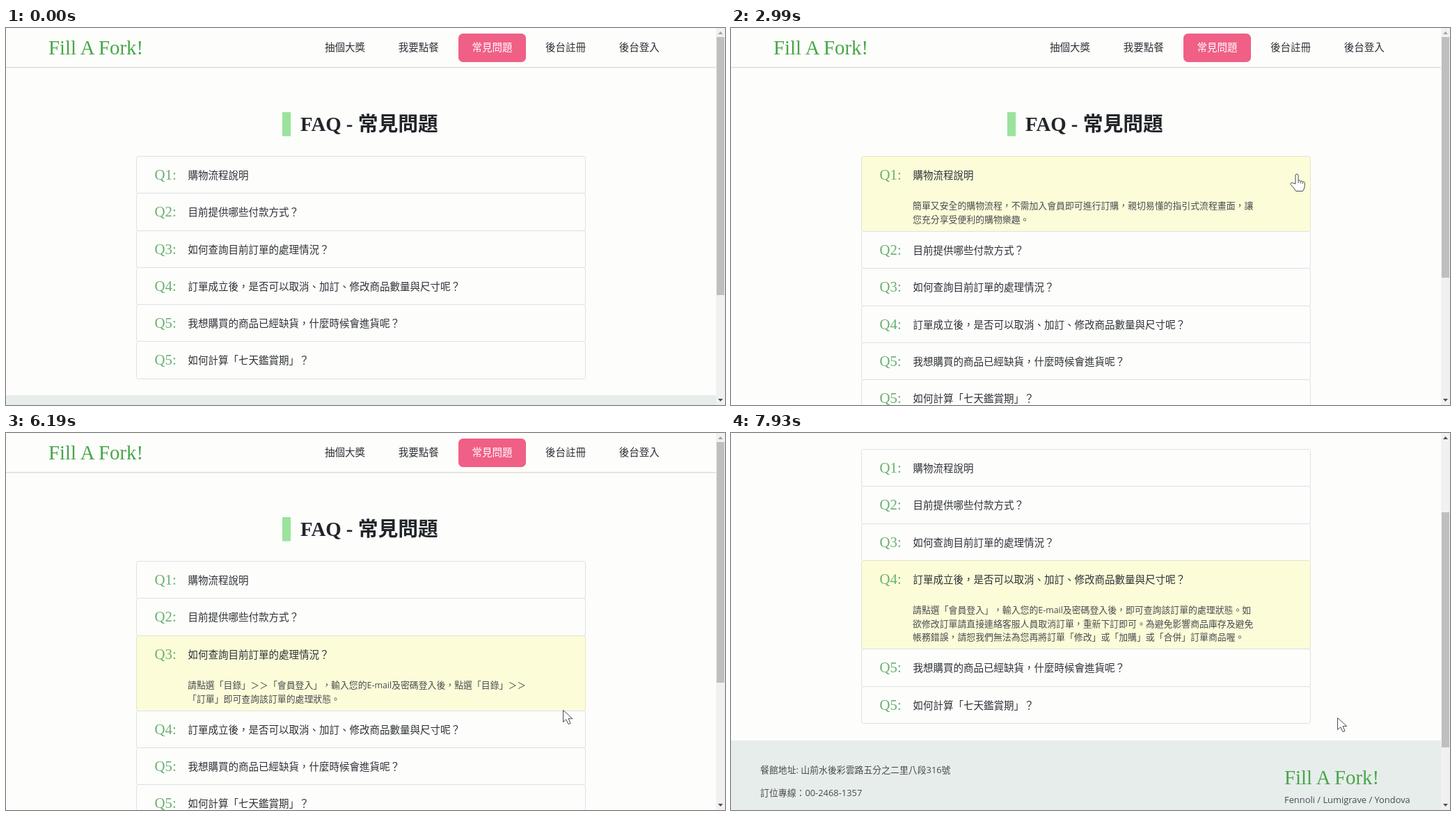
Recreate the animation shown at these times as an HTML page. Size 1033x542 px, loop 8000 ms.

```html
<!DOCTYPE html>
<html lang="zh-Hant">
<head>
<meta charset="utf-8">
<title>FAQ</title>
<style>
  html, body { margin: 0; width: 100%; height: 100%; overflow: hidden; background: #fdfdfb; }
  #stage { display: block; width: 1033px; height: 542px; }
  text {
    font: 14.5px "Open Sans", "Noto Sans CJK TC", "Noto Sans CJK", sans-serif;
    fill: #2c3034; text-spacing-trim: space-all; white-space: pre;
  }
  text.brand { font: 28.8px "Liberation Serif", serif; fill: #47a649; }
  text.title { font: bold 28.8px "Liberation Serif", "Noto Sans CJK TC", "Noto Sans CJK", serif; fill: #212529; }
  text.label { font: 20.8px "Liberation Serif", serif; fill: #69b070; }
  text.small { font-size: 12.88px; fill: #484b4e; }
  text.on { fill: #fff; }
  .latin { font-size: 12.4px; }
  .box { stroke: #dfe0e6; stroke-width: 1; }
  .cursor path { fill: #fff; stroke: #4a4a54; stroke-width: 1; stroke-linejoin: round; }
</style>
</head>
<body>
<svg id="stage" viewBox="0 0 1033 542">
  <g id="page">
    <rect y="56" width="1020" height="1" fill="#dcddd3"/>
    <rect y="57" width="1020" height="1" fill="#f0f0ea"/>
    <rect x="650" y="8" width="97" height="41" rx="6.5" fill="#f05f86"/>
    <rect x="397" y="121" width="12" height="34.5" fill="#9ae39d"/>
  </g>
  <g id="bar">
    <rect x="1020" width="13" height="542" fill="#f1f1f1"/>
    <rect id="thumb" x="1021" width="11" fill="#bfbfbf"/>
    <path id="up" d="M1023 9L1026.5 5L1030 9Z"/>
    <path d="M1023 533L1026.5 537L1030 533Z" fill="#505050"/>
  </g>
  <g id="arrow" class="cursor">
    <path d="M.5 .5V17.5L4.7 13.8L8 20.6L11 19.3L8 12.7H13.8Z"/>
  </g>
  <g id="hand" class="cursor">
    <path d="M-2 14V2a2 2 0 0 1 4 0V9.5a2 2 0 0 1 3.2 .8a2 2 0 0 1 3 1a1.8 1.8 0 0 1 3 1.6V17Q11 21 8.5 24.5H-1.5Q-4 20 -8.3 15.8A1.9 1.9 0 0 1 -5.5 13Z"/>
    <path d="M2 9.5V13M5.2 10.5V13.5M8.2 11.5V14"/>
  </g>
</svg>
<script>
const LOOP = 8000, VIEW = 542, TOP = 184.5, ROW = 53.25, LINE = 19.44, SLIDE = 400;
const BRAND = 'Fill A Fork!';
const $ = id => document.getElementById(id);

function add(parent, tag, attrs, text) {
  const el = document.createElementNS('http://www.w3.org/2000/svg', tag);
  set(el, attrs);
  if (text) el.innerHTML = text;
  return parent.appendChild(el);
}
function set(el, attrs) {
  for (const k in attrs) el.setAttribute(k, attrs[k]);
}
const write = (parent, x, y, text, cls = '') => add(parent, 'text', { x, y, class: cls }, text);
const latin = s => s.replace(/[A-Za-z-]{2,}/g, '<tspan class="latin">$&</tspan>');

// start and end are the moments an answer begins to open and to close
const faq = [
  { label: 'Q1:', ask: '購物流程說明', start: 2600, end: 3780, answer: [
    '簡單又安全的購物流程，不需加入會員即可進行訂購，親切易懂的指引式流程畫面，讓',
    '您充分享受便利的購物樂趣。'] },
  { label: 'Q2:', ask: '目前提供哪些付款方式？', start: 3780, end: 4660, answer: [
    '目前提供付款方式有四種：『超商取貨』付款、『信用卡』付款、『ATM』付款、『超',
    '商代碼』付款。'] },
  { label: 'Q3:', ask: '如何查詢目前訂單的處理情況？', start: 4660, end: 6580, answer: [
    '請點選「目錄」＞＞「會員登入」，輸入您的E-mail及密碼登入後，點選「目錄」＞＞',
    '「訂單」即可查詢該訂單的處理狀態。'] },
  { label: 'Q4:', ask: '訂單成立後，是否可以取消、加訂、修改商品數量與尺寸呢？', start: 6580, end: 9000, answer: [
    '請點選「會員登入」，輸入您的E-mail及密碼登入後，即可查詢該訂單的處理狀態。如',
    '欲修改訂單請直接連絡客服人員取消訂單，重新下訂即可。為避免影響商品庫存及避免',
    '帳務錯誤，請恕我們無法為您再將訂單「修改」或「加購」或「合併」訂單商品喔。'] },
  { label: 'Q5:', ask: '我想購買的商品已經缺貨，什麼時候會進貨呢？', start: 9000, end: 9000, answer: [] },
  { label: 'Q5:', ask: '如何計算「七天鑑賞期」？', start: 9000, end: 9000, answer: [] }
];

// time, x, y
const path = [
  [1910, 899, 118], [1980, 884, 140], [2120, 832, 196], [2250, 813, 210],
  [3210, 813, 210], [3440, 811, 262], [3680, 809, 308],
  [4200, 809, 308], [4360, 806, 372], [5420, 806, 372], [5700, 808, 384],
  [6190, 800, 398], [6290, 800, 412], [6360, 801, 424],
  [7050, 801, 424], [7370, 868, 414], [7520, 870, 413], [7660, 873, 411], [7930, 871, 409]
];
// time, scroll offset
const wheel = [[7630, 0], [7660, 5], [7700, 24], [7760, 59], [7860, 119], [7930, 161]];

function at(table, t, col) {
  const i = table.findIndex(r => r[0] > t);
  if (i === 0) return table[0][col];
  if (i < 0) return table[table.length - 1][col];
  const a = table[i - 1], b = table[i];
  return a[col] + (b[col] - a[col]) * (t - a[0]) / (b[0] - a[0]);
}
function swing(t, start) {
  const p = Math.min(1, Math.max(0, (t - start) / SLIDE));
  return .5 - Math.cos(p * Math.PI) / 2;
}
// centre of the pixel row, so that thin borders stay crisp
const snap = y => Math.floor(y) + .5;

const page = $('page');
['抽個大獎', '我要點餐', '常見問題', '後台註冊', '後台登入'].forEach((s, i) =>
  write(page, 458 + i * 105.7, 33.3, s, i === 2 ? 'on' : ''));
write(page, 61, 38, BRAND, 'brand');
write(page, 423, 148, 'FAQ - 常見問題', 'title');

for (const q of faq) {
  q.g = add(page, 'g', {});
  q.box = add(q.g, 'rect', { class: 'box', x: 187.5, y: 0, width: 645, rx: 3 });
  write(q.g, 213.6, 33, q.label, 'label');
  write(q.g, 261.5, 32, q.ask);
  q.clip = add(q.g, 'svg', { x: 0, y: ROW, width: 1020, height: 0, overflow: 'hidden' });
  q.body = add(q.clip, 'g', {});
  q.answer.forEach((s, i) => write(q.body, 261, 14.6 + i * LINE, latin(s), 'small'));
  q.full = q.answer.length * LINE + 16;
}

const footer = add(page, 'g', {});
add(footer, 'rect', { width: 1020, height: 224, fill: '#e7edeb' });
write(footer, 42, 47, '餐館地址: 山前水後彩雲路五分之二里八段316號', 'small');
write(footer, 42, 79.5, '訂位專線：00-2468-1357', 'small');
write(footer, 795, 62.5, BRAND, 'brand');
write(footer, 795, 89.7, 'Fennoli / Lumigrave / Yondova', 'small');

function draw(t) {
  let y = TOP, extra = 0;
  for (const q of faq) {
    const p = swing(t, q.start) - swing(t, q.end), h = q.full * p;
    const open = t >= q.start && t < q.end;
    const top = snap(y);
    y += ROW + h;
    extra += h;
    set(q.g, { transform: `translate(0 ${top})` });
    set(q.box, { height: snap(y) - top, fill: open ? '#fcfcd9' : '#fdfdfc' });
    q.box.style.stroke = open ? '#e3e4c8' : '';
    set(q.clip, { height: h });
    set(q.body, { transform: `translate(0 ${8 * p})` });
  }
  set(footer, { transform: `translate(0 ${Math.round(528.4 + extra)})` });

  const scroll = Math.round(at(wheel, t, 1)), ratio = 516 / (752 + extra);
  set(page, { transform: `translate(0 ${-scroll})` });
  set($('thumb'), { y: Math.round(13 + scroll * ratio), height: Math.floor(VIEW * ratio) });
  set($('up'), { fill: scroll > 0 ? '#505050' : '#a3a3a3' });

  const x = at(path, t, 1), cy = at(path, t, 2);
  const onItem = x < 833 && cy > TOP && !(t >= 6180 && t < 6240);
  for (const [id, on] of [['arrow', !onItem], ['hand', onItem]]) {
    set($(id), {
      transform: `translate(${Math.round(x)} ${Math.round(cy)})`,
      visibility: on && t >= 1910 ? 'visible' : 'hidden'
    });
  }
}

function tick() {
  draw(performance.now() % LOOP);
  requestAnimationFrame(tick);
}
tick();
</script>
</body>
</html>
```
